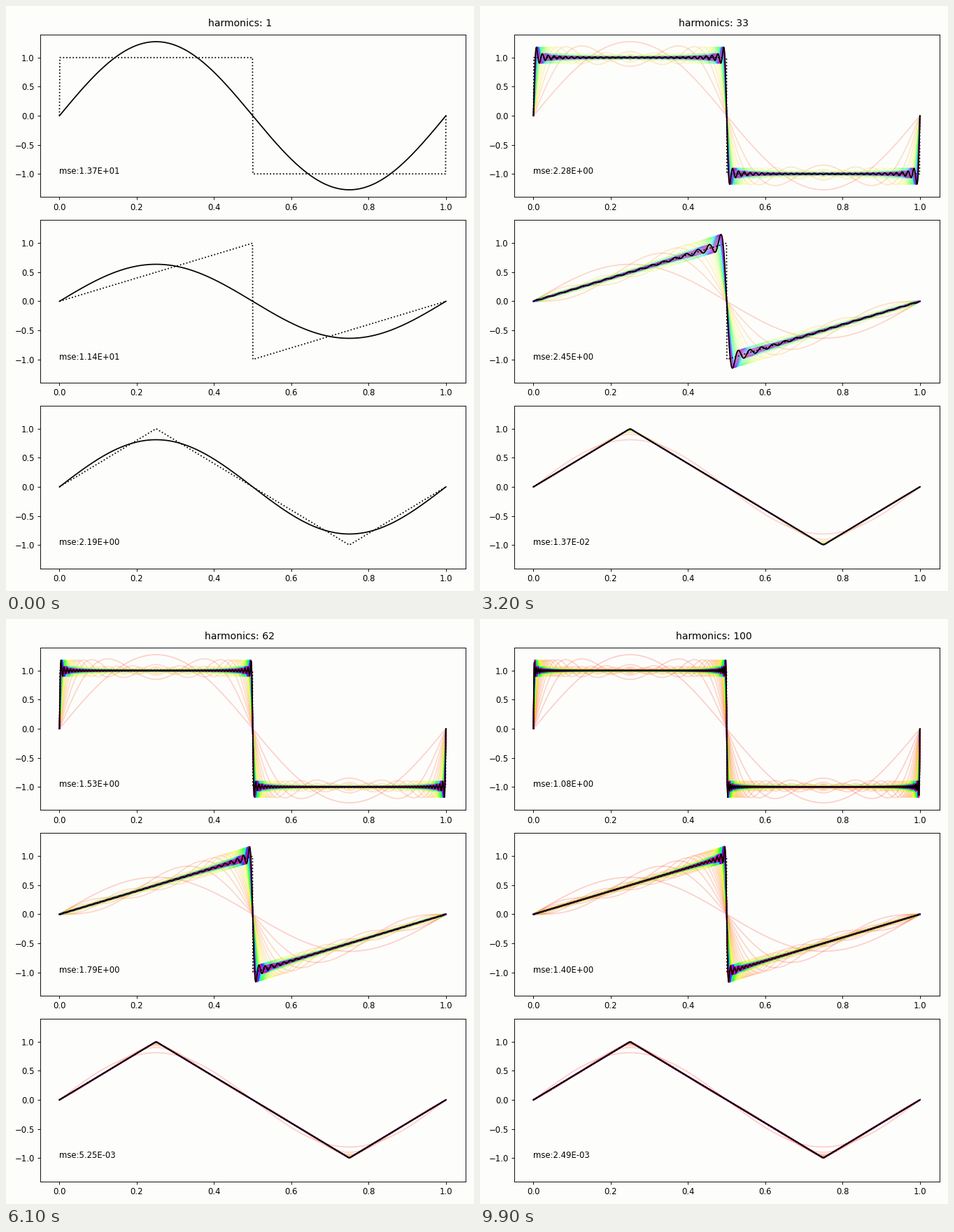
These frames come from a looping animation (669 px wide and 837 px high, 10000 ms). A matplotlib script:

```python
import colorsys

import matplotlib.pyplot as plt
import numpy as np
from matplotlib.animation import FuncAnimation

W, H, DPI = 669, 837, 83.625
COUNT = 100
PAPER = "#fdfefc"
LEFT, RIGHT, TOP, BOTTOM = 48.8, 656.5, 40.5, 804.5  # pixels
PLOT, GAP = 233, 32.5

x = np.linspace(0, 1, 1000)
k = np.arange(1, COUNT + 1)[:, None]
odd = 2 * k - 1
sign = (-1.0) ** (k + 1)


def partial_sums(coef, freq):
    return np.cumsum(coef * np.sin(2 * np.pi * freq * x), axis=0)


# Each wave: exact shape and its partial Fourier sums
waves = [
    (np.sign(np.round(np.sin(2 * np.pi * x), 9)),
     partial_sums(4 / (np.pi * odd), odd)),
    (np.where(x < 0.5, 2 * x, 2 * x - 2),
     partial_sums(2 * sign / (np.pi * k), k)),
    (2 / np.pi * np.arcsin(np.sin(2 * np.pi * x)),
     partial_sums(8 * sign / (np.pi * odd) ** 2, odd)),
]

fig, axes = plt.subplots(3, 1, figsize=(W / DPI, H / DPI), dpi=DPI,
                         facecolor=PAPER)
fig.subplots_adjust(left=LEFT / W, right=RIGHT / W, top=1 - TOP / H,
                    bottom=1 - BOTTOM / H, hspace=GAP / PLOT)
title = fig.suptitle("harmonics: 1", y=0.979)


class Panel:
    def __init__(self, ax, shape, sums, coarse):
        self.sums = sums
        self.errors = np.sqrt(((sums - shape) ** 2).sum(axis=1))
        ax.set(xlim=(-0.05, 1.05), ylim=(-1.4, 1.4), facecolor=PAPER)
        self.trail = []
        for i, y in enumerate(sums[:-1]):
            step = 3 if coarse or i < 12 else 1
            self.trail += ax.plot(x[::step], y[::step], lw=1.5, alpha=0.2,
                                  visible=False)
        self.line, = ax.plot(x, sums[0], "k", lw=1.5)
        ax.plot(x, shape, "k:", lw=1.5)
        self.label = ax.text(0, -1, "")

    def show(self, n):
        for i, line in enumerate(self.trail, 1):
            line.set_visible(i < n)
            if i < n:
                line.set_color(colorsys.hsv_to_rgb(i / n, 1, 1))
        self.line.set_ydata(self.sums[n - 1])
        self.label.set_text(f"mse:{self.errors[n - 1]:.2E}")


panels = [Panel(ax, *wave, coarse=j == 2)
          for j, (ax, wave) in enumerate(zip(axes, waves))]


def update(frame):
    n = frame + 1
    title.set_text(f"harmonics: {n}")
    for panel in panels:
        panel.show(n)


anim = FuncAnimation(fig, update, frames=COUNT, interval=100, repeat=True)
plt.show()
```
